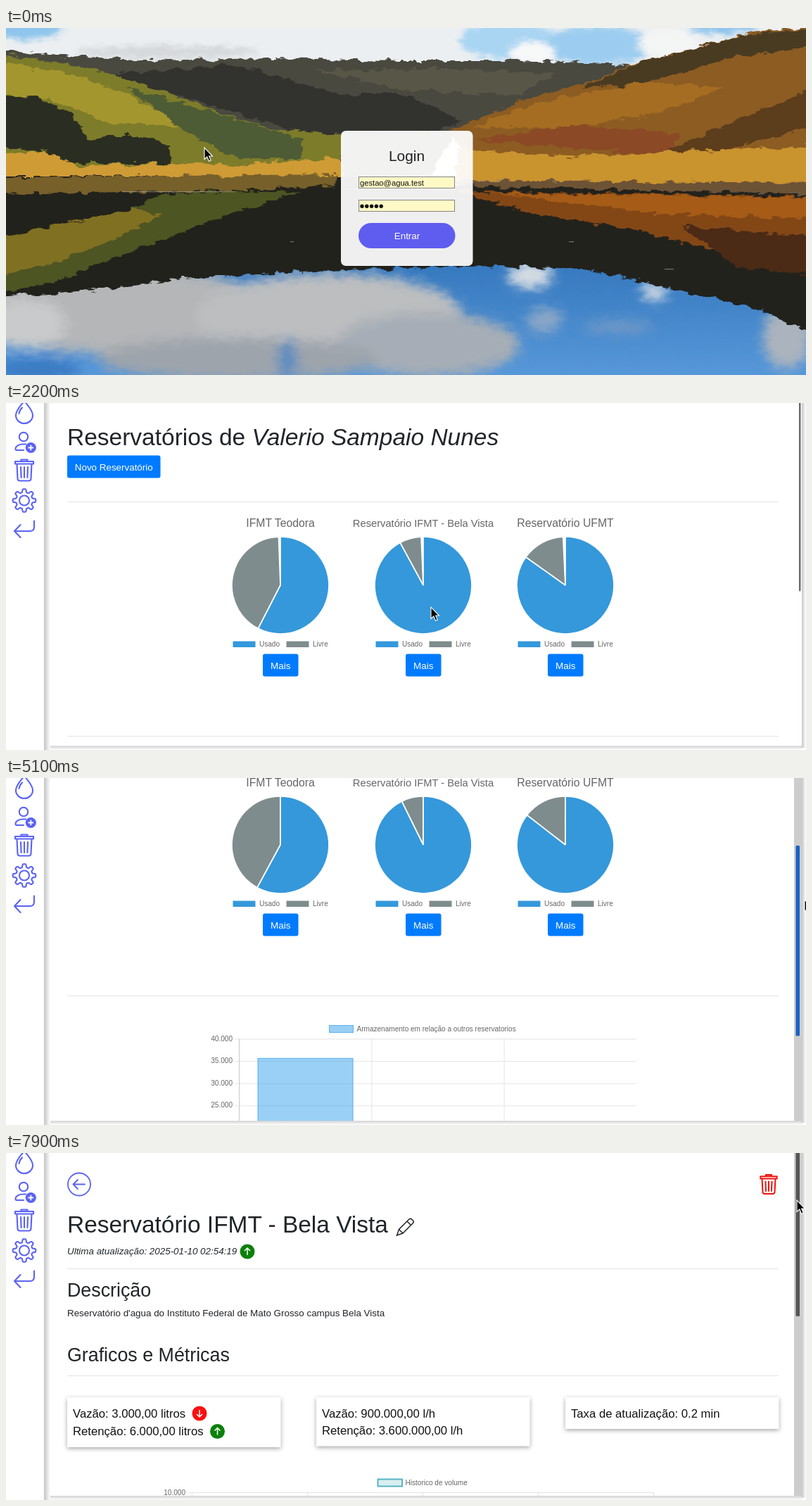
An HTML page for the animation above (8 s loop, 1137x493 px).

```html
<!DOCTYPE html>
<html lang="pt">
<head>
<meta charset="utf-8">
<title>Reservatórios</title>
<style>
  html, body { margin: 0; width: 100%; height: 100%; overflow: hidden; background: #fff; }
  svg { display: block; width: 1137px; height: 493px; }
  text { font-family: "Liberation Sans", Arial, sans-serif; white-space: pre; }
  .card { fill: #fff; filter: drop-shadow(0 2px 3px rgba(0, 0, 0, .35)); }
  .icon { fill: none; stroke: #5b63f3; stroke-width: 2.1; stroke-linecap: round; stroke-linejoin: round; }
</style>
</head>
<body>
<svg id="stage" viewBox="0 0 1137 493"></svg>
<script>
const LOOP = 8000, STEP = 100;
const BLUE = '#3498db', HOVER = '#1e91ea', GRAY = '#7f8c8d', INK = '#212529', LINE = '#e4e4e4';
const stage = document.getElementById('stage');

// Markup helpers
const rect = (x, y, w, h, fill, extra = '') =>
  `<rect x="${x}" y="${y}" width="${w}" height="${h}" fill="${fill}" ${extra}/>`;
const text = (x, y, size, str, fill = INK, extra = '') =>
  `<text x="${x}" y="${y}" font-size="${size}" fill="${fill}" ${extra}>${str}</text>`;
const path = (d, extra = '') => `<path d="${d}" ${extra}/>`;
const shape = (fill, d) => path(d, `fill="${fill}"`);
const blob = (x, y, rx, ry, fill) => `<ellipse cx="${x}" cy="${y}" rx="${rx}" ry="${ry}" fill="${fill}"/>`;
const group = (inner, extra = '') => `<g ${extra}>${inner}</g>`;
const rule = y => rect(87, y, 1011, 1, LINE);
const MID = 'text-anchor="middle"', END = 'text-anchor="end"', ITALIC = 'font-style="italic"';
const button = (x, y, w, h, label, id = '') =>
  rect(x, y, w, h, '#007bff', `rx="3" ${id && `id="${id}"`}`) + text(x + w / 2, y + h / 2 + 5, 13.4, label, '#fff', MID);
const fade = (id, x2, y2, from) =>
  `<linearGradient id="${id}" x2="${x2}" y2="${y2}"><stop stop-color="${from}"/><stop offset="1" stop-color="#fff"/></linearGradient>`;

const defs = `<defs>
  <clipPath id="panel"><rect x="54" width="1077" height="487"/></clipPath>
  ${fade('side', 1, 0, '#c4c4c4')}${fade('edge', 1, 0, '#c6c6c6')}${fade('foot', 0, 1, '#d2d2d2')}
  <linearGradient id="sky" x2="0" y2="1"><stop stop-color="#3577bd"/><stop offset="1" stop-color="#5a9bdc"/></linearGradient>
  <filter id="rough" x="0" y="0" width="100%" height="100%">
    <feTurbulence type="fractalNoise" baseFrequency=".06 .12" numOctaves="3" seed="4"/>
    <feDisplacementMap in="SourceGraphic" scale="13" xChannelSelector="R" yChannelSelector="G"/>
  </filter>
  <filter id="soft" x="-20%" y="-20%" width="140%" height="140%"><feGaussianBlur stdDeviation="8"/></filter>
  <filter id="haze" x="-20%" y="-20%" width="140%" height="140%"><feGaussianBlur stdDeviation="4"/></filter>
</defs>`;

function landscape() {
  const sky = rect(-10, -10, 1160, 80, '#eceff1') +
    group(blob(20, 2, 60, 14, '#8fc5ec') + blob(715, 18, 70, 26, '#a9d5f3') + blob(840, 25, 80, 28, '#9ccdf0') +
      blob(1020, 0, 50, 9, '#8fc5ec') + blob(748, 34, 32, 15, '#f7f8f8') + blob(940, 22, 42, 20, '#f4f5f5') +
      blob(230, 34, 130, 9, '#d5d8da'), 'filter="url(#haze)"');
  const water = rect(-10, 330, 1160, 180, 'url(#sky)') +
    group(blob(150, 400, 230, 62, '#b4b6b8') + blob(460, 410, 190, 62, '#bcbec0') + blob(600, 450, 130, 45, '#a6adb6') +
      blob(330, 470, 200, 30, '#9ea4ac') + blob(25, 420, 60, 35, '#c9cacb') + blob(745, 352, 32, 18, '#d4dbe2') +
      blob(922, 374, 18, 13, '#c9d5e2') + blob(1110, 440, 34, 45, '#aab3be') + blob(765, 415, 25, 18, '#88a6c6') +
      blob(870, 425, 50, 9, '#7098c6') + blob(45, 485, 60, 16, '#3b7cc4') + blob(400, 470, 14, 28, '#5f8dc0'),
      'filter="url(#soft)"');
  const hills =
    shape('#494840', 'M-10 30L60 38 200 46 380 43 560 46 700 46 890 52 800 92 640 150 600 212 0 212Z') +
    shape('#33322f', 'M150 66L330 52 480 96 560 92 650 132 600 150 420 150Z') +
    shape('#595746', 'M440 60L620 58 780 64 730 96 560 88Z') +
    shape('#7d7c2a', 'M-10 38L110 54 190 78 300 118 380 144 478 152V196H-10Z') +
    shape('#a4962f', 'M-10 48L100 68 175 94 250 140 150 136 60 100-10 94Z') +
    shape('#4d5c34', 'M170 84L300 120 420 158 420 186 330 186 260 150Z') +
    shape('#292d22', 'M-10 98L40 96 95 122 115 160 145 152 190 152 232 168 235 192 80 192 60 176-10 170Z') +
    shape('#8c5c22', 'M1150-2L1060 6 980 28 890 52 820 80 740 100 630 146 664 200 1150 222Z') +
    shape('#4a3a20', 'M1150 0L1050 10 900 50 820 84 900 80 1040 40 1150 26Z') +
    shape('#a56d23', 'M760 105L900 78 1020 84 930 120 800 142 660 142Z') +
    shape('#5b3c1c', 'M930 176L1020 140 1150 84V140L1010 176Z') +
    shape('#8c4a25', 'M664 160L800 138 960 150 940 180 800 170Z');
  const shore =
    shape('#cf9b36', 'M-10 178L60 176 100 196 240 192 330 194 478 184V212H-10Z') +
    shape('#c9932f', 'M640 172L800 182 930 176 1150 168V222L640 216Z') +
    shape('#6d5234', 'M640 216L1150 220V236L640 226Z');
  const mirror =
    shape('#20211e', 'M-10 210H478L640 224 1150 236V434L1080 404 1000 382 820 342 660 338 480 344 250 356 130 372-10 382Z') +
    shape('#77612a', 'M-10 212L470 208 470 224 300 232-10 236Z') +
    shape('#4e5420', 'M-10 242L340 232 420 234 330 260 250 290 160 325 70 362-10 376Z') +
    shape('#806f20', 'M-10 290L160 250 220 266 150 302 80 330-10 352Z') +
    shape('#24241c', 'M-10 236L230 232 170 260 70 280-10 300Z') +
    shape('#834717', 'M640 232L1150 240V328L1020 320 900 288 740 262Z') +
    shape('#a65c19', 'M690 234L1150 242V270L920 264Z') +
    shape('#4b2c14', 'M960 282L1150 296V350L1040 340Z');
  const glints = [[165, 232, 160], [480, 228, 160], [936, 342, 13], [800, 303, 7], [404, 303, 5]]
    .map(([x, y, w]) => rect(x, y, w, 1.2, '#b8b5a8', 'opacity=".55"')).join('');
  return group(sky + water + hills + shore + mirror, 'filter="url(#rough)"') + glints;
}

function login() {
  const field = y => rect(501.5, y + .5, 136, 16, '#fef9c5', 'stroke="#858585"');
  const dots = [0, 1, 2, 3, 4].map(i => blob(506 + i * 6.8, 253.3, 2.7, 2.7, '#111')).join('');
  return landscape() + rect(476, 146, 187.5, 192, '#fff', 'rx="7" fill-opacity=".93"') +
    text(569.5, 189, 20.9, 'Login', '#222', MID) + field(211) + field(244) +
    text(503, 224, 11.2, 'gestao@agua.test', '#111') + dots +
    rect(501, 277, 137.5, 36, '#5f5cf0', 'rx="18"') + text(570, 299.5, 13.4, 'Entrar', '#fff', MID);
}

// Centred on 0,0; about 27 by 31
const trash = (x, y, k, extra = '') => group(
  path('M-13-12.5H13V-9H-13ZM-4.5-12.5V-15H4.5V-12.5M-10.5-9L-9.5 12Q-9.3 15-6.5 15H6.5Q9.3 15 9.5 12L10.5-9M0-4.5V10.5M-5-4.5L-4.4 10.5M5-4.5L4.4 10.5'),
  `class="icon" transform="translate(${x} ${y}) scale(${k})" ${extra}`);

function gear(cx, cy) {
  const pts = [];
  for (let a = 0; a < 360; a += 3) {
    const w = Math.cos(a * 8 * Math.PI / 180);
    const r = 14 + 2.3 * Math.tanh(2.5 * w);
    pts.push((cx + r * Math.cos(a * Math.PI / 180)).toFixed(1) + ' ' + (cy + r * Math.sin(a * Math.PI / 180)).toFixed(1));
  }
  return path('M' + pts.join('L') + 'Z') + `<circle cx="${cx}" cy="${cy}" r="7"/>`;
}

function sidebar() {
  return rect(0, 0, 54, 493, '#fff') + rect(54, 0, 9, 493, 'url(#side)') +
    group(path('M26-3C31 4 38 10 38 17.5A12 11.5 0 0 1 14 17.5C14 10 21 4 26-3ZM18.5 15Q19 10.500 23 6.500') +
      '<circle cx="25" cy="48" r="6.2"/>' +
      path('M25 67H15Q13.500 67 13.500 65C14 60 19 58 28 58.500') + gear(26, 138.500) +
      path('M40 167.500V176Q40 182 34 182H13M20.500 173L12 182 20.500 191'), 'class="icon"') +
    blob(35.3, 63.5, 7.6, 7.6, '#5b63f3') + path('M31.500 63.500H39M35.300 59.700V67.300', 'stroke="#fff" stroke-width="1.8"') +
    trash(26, 95.5, 1);
}

const PIES = [
  { x: 390, share: .579, start: 1477, name: 'IFMT Teodora', size: 15.75, value: '35.613' },
  { x: 593, share: .927, start: 1487, name: 'Reservatório IFMT - Bela Vista', size: 14.7, value: '9.270' },
  { x: 795, share: .8548, start: 1495, name: 'Reservatório UFMT', size: 15.75, value: '8.548' },
];
const PIE_Y = 259, PIE_R = 69;

function pieMarkup(p, i) {
  const x = p.x, mid = p.share * Math.PI;
  const key = (dx, fill, label) => rect(x + dx, 338.5, 32, 8.5, fill) + text(x + dx + 37.5, 346, 10.05, label, '#666');
  const tip = rect(-51, -19, 47, 38.5, '#000', 'rx="5"') + shape('#000', 'M-5-4.500L0 0-5 4.500Z');
  return text(x, 176, p.size, p.name, '#666', MID) +
    group(`<path id="free${i}" fill="${GRAY}"/><path id="used${i}"/>`, 'stroke="#fff" stroke-width="1.7" stroke-linejoin="bevel"') +
    key(-67.5, BLUE, 'Usado') + key(8.5, GRAY, 'Livre') + button(x - 25, 356.5, 50.5, 32, 'Mais', 'more' + i) +
    group(group(tip, 'opacity=".8"') + text(-46, -5, 10, 'Usado', '#fff', 'font-weight="bold"') +
      rect(-45.5, 4, 10, 10, BLUE, 'stroke="#fff" stroke-width="1.200"') + text(-34, 12.5, 10, p.value, '#fff'),
      `id="tip${i}" transform="translate(${x + 34 * Math.sin(mid)} ${PIE_Y - 34 * Math.cos(mid)})"`);
}

function barChart() {
  const top = 534.5, gap = 31.6, base = top + 8 * gap;
  let out = rect(459.5, 515.5, 34, 10, '#9acff5', 'stroke="#5fb2ec"') +
    text(498.5, 523.5, 10.05, 'Armazenamento em relação a outros reservatorios', '#666');
  for (let i = 0; i <= 8; i++) {
    const v = 40 - i * 5;
    out += rect(325, top + i * gap, 571, 1, LINE) + text(322, top + i * gap + 3, 10.05, v ? v + '.000' : '0', '#666', END);
  }
  [35.6, 9.27, 8.55].forEach((v, i) => {
    const x = 331 + i * 188.3, h = v / 5 * gap;
    out += rect(x, top, 1, base - top + 5, i ? LINE : '#c9c9c9') +
      rect(x + 27, base - h, 135, h, '#36a2eb', 'fill-opacity=".5" stroke="#36a2eb" stroke-opacity=".8"') +
      text(x + 94, base + 16, 10.05, PIES[i].name, '#666', MID);
  });
  return out;
}

function dashboard() {
  return text(87, 59.5, 33.5, `Reservatórios de <tspan ${ITALIC}>Valerio Sampaio Nunes</tspan>`) +
    button(87, 74.5, 132.5, 32, 'Novo Reservatório') + rule(140) + PIES.map(pieMarkup).join('') + rule(473) + barChart();
}

function detail() {
  const badge = (x, y, fill, up) => blob(x, y, 10.5, 10.5, fill) +
    path('M0 5V-5M-4-1L0-5 4-1', `transform="translate(${x} ${y}) scale(1 ${up ? 1 : -1})" fill="none" stroke="#fff" stroke-width="1.500"`);
  const card = (x, h) => rect(x, 347, 303.5, h, '#fff', 'class="card"');
  const big = (x, y, s) => text(x, y, 16.7, s, '#111');
  let out = group('<circle cx="104" cy="44.500" r="16"/>' + path('M112 44.500H96M102 38L95.500 44.500 102 51'), 'class="icon" style="stroke-width:1.800"') +
    trash(1084, 44.5, .9, 'style="stroke:#f0120f;stroke-width:2.200"') +
    text(87, 113, 33.45, 'Reservatório IFMT - Bela Vista') +
    path('M555.500 117L558.500 108.500 573 94Q575 92.500 577 94.500L578.500 96Q580 98 578.500 99.500L564 114ZM570 97L575.500 102.500M558.500 108.500L564 114', `fill="none" stroke="${INK}" stroke-width="1.500"`) +
    text(87, 143.5, 13.4, 'Ultima atualização: 2025-01-10 02:54:19', INK, ITALIC) + badge(343, 140, '#0a800a', true) +
    rule(164) + text(87, 204, 26.8, 'Descrição') +
    text(87, 232, 13.4, "Reservatório d'agua do Instituto Federal de Mato Grosso campus Bela Vista") +
    text(87, 296, 26.8, 'Graficos e Métricas') + rule(316) + card(87, 71) + card(441, 69.5) + card(795, 45) +
    big(95, 376, 'Vazão: 3.000,00 litros') + badge(275, 370, '#fa0f0f', false) +
    big(95, 401, 'Retenção: 6.000,00 litros') + badge(300.5, 395.5, '#0a800a', true) +
    big(449, 375.5, 'Vazão: 900.000,00 l/h') + big(449, 400, 'Retenção: 3.600.000,00 l/h') +
    big(803, 375.5, 'Taxa de atualização: 0.2 min') +
    rect(528.5, 463.5, 34.5, 10, '#d8eff0', 'stroke="#56b4c4" stroke-width="2"') +
    text(567.5, 471.5, 10.05, 'Historico de volume', '#666') +
    text(255, 485.5, 10.05, '10.000', '#666', END) + rect(258, 482, 662, 1, LINE);
  for (let x = 264; x <= 920; x += 164) out += rect(x, 482, 1, 11, LINE);
  return out;
}

stage.innerHTML = defs + rect(0, 0, 1137, 493, '#fff') +
  group(group(dashboard(), 'id="dash"') + group(detail(), 'id="detail"'), 'clip-path="url(#panel)"') +
  rect(56, 487, 1075, 6, 'url(#foot)') + rect(1131, 0, 6, 490, 'url(#edge)') + sidebar() +
  rect(1120, 0, 11, 487, '#cdcdcd', 'id="track"') + rect(0, 0, 2, 0, '#666', 'id="thumb" rx="1.500"') +
  group(path('M0 482H215Q218.500 482 218.500 486V493H0Z', 'fill="#39393b"') +
    text(0, 495, 10.5, 'l.eu.cdn.jsdelivr.net', '#d5d5d5'), 'id="status"') +
  group(login(), 'id="login"') +
  path('M0 0V16.500L3.800 13 6.500 19.200 9.200 18 6.600 12H11.500Z', 'id="mouse" fill="#000" stroke="#fff" stroke-width="1.100"');

const el = id => document.getElementById(id);
const ui = {};
for (const id of ['dash', 'detail', 'login', 'track', 'thumb', 'status', 'mouse', 'more1']) ui[id] = el(id);
const slices = PIES.map((p, i) => ({ used: el('used' + i), free: el('free' + i), tip: el('tip' + i) }));

// time, x, y of the pointer tip
const MOUSE = [
  [0, 282, 170], [200, 282, 170], [600, 470, 250], [1000, 604, 290], [2500, 604, 290], [2900, 432, 262], [3100, 430, 260],
  [3500, 990, 150], [3600, 1160, 130], [3800, 1160, 70], [3900, 1133, 72], [4100, 1124, 76], [4600, 1121, 334],
  [4700, 1121, 335], [4800, 1120, 334], [4900, 1120, 334], [5100, 1135, 173], [5300, 1135, 74], [5500, 1132, 70],
  [5700, 900, 210], [5800, 830, 260], [6000, 699, 340], [6200, 592, 370], [6500, 590, 372], [6700, 620, 360],
  [7200, 1090, 120], [7300, 1122, 90], [7500, 1122, 90], [7900, 1124, 67],
];
// time, top of the scroll thumb
const SCROLL = [[0, 0], [4100, 0], [4600, 219], [4900, 219], [5100, 99], [5300, 0]];
// pie, hover start, hover end
const HOVERS = [[1, 2500, 2700], [0, 2800, 3200], [2, 5700, 5900]];

function track(keys, t) {
  const i = keys.findLastIndex(k => k[0] <= t), a = keys[i], b = keys[i + 1];
  if (!b) return a.slice(1);
  const f = (t - a[0]) / (b[0] - a[0]);
  return a.slice(1).map((v, j) => v + (b[j + 1] - v) * f);
}
const clamp = v => Math.max(0, Math.min(1, v));
const show = (node, on) => { node.style.display = on ? '' : 'none'; };

function wedge(x, from, to) {
  if (to - from < 1e-4) return '';
  const at = f => `${x + PIE_R * Math.sin(f * 2 * Math.PI)} ${PIE_Y - PIE_R * Math.cos(f * 2 * Math.PI)}`;
  return `M${x} ${PIE_Y}L${at(from)}A${PIE_R} ${PIE_R} 0 ${to - from > .5 ? 1 : 0} 1 ${at(to)}Z`;
}

function drawPies(t) {
  PIES.forEach((p, i) => {
    const done = 1 - (1 - clamp((t - p.start) / 1000)) ** 4;
    let alpha = 0;
    for (const [pie, a, b] of HOVERS)
      if (pie === i) alpha = Math.min(clamp((t - a) / 150), clamp(1 - (t - b) / 200));
    const s = slices[i];
    s.used.setAttribute('d', wedge(p.x, 0, p.share * done));
    s.free.setAttribute('d', wedge(p.x, p.share * done, done));
    s.used.setAttribute('fill', alpha > 0 ? HOVER : BLUE);
    s.tip.setAttribute('opacity', alpha);
  });
}

function drawScrollbar(t, top, onDetail) {
  const wide = (t >= 3900 && t < 5700) || t >= 7600;
  const drag = t >= 4100 && t < 5400;
  const box = { x: wide ? 1122.5 : 1127, y: top - 3, width: wide ? 5.5 : 2.5, height: (onDetail ? 232 : 267.5) + 3 };
  for (const k in box) ui.thumb.setAttribute(k, box[k]);
  ui.thumb.setAttribute('fill', drag ? '#1a62c4' : wide ? '#555' : '#6a6a6a');
  show(ui.track, wide);
  show(ui.thumb, t >= 1600 && !(t >= 6500 && t < 6600));
}

function draw(t) {
  const onDetail = t >= 6500;
  show(ui.login, t < 1400);
  show(ui.dash, t >= 1400 && !onDetail);
  show(ui.detail, onDetail);
  show(ui.status, (t >= 1400 && t < 1700) || (t >= 6500 && t < 6800));
  const [top] = track(SCROLL, t);
  ui.dash.setAttribute('transform', `translate(0 ${-Math.round(top * 1.655)})`);
  drawPies(t);
  drawScrollbar(t, top, onDetail);
  ui.more1.setAttribute('fill', t >= 6200 && t < 6500 ? '#0069d9' : '#007bff');
  const [x, y] = track(MOUSE, t);
  ui.mouse.setAttribute('transform', `translate(${x} ${y})`);
}

const begin = performance.now();
function tick() {
  const t = Math.max(0, performance.now() - begin) % LOOP;
  draw(Math.floor(t / STEP) * STEP);
  requestAnimationFrame(tick);
}
tick();
</script>
</body>
</html>
```
